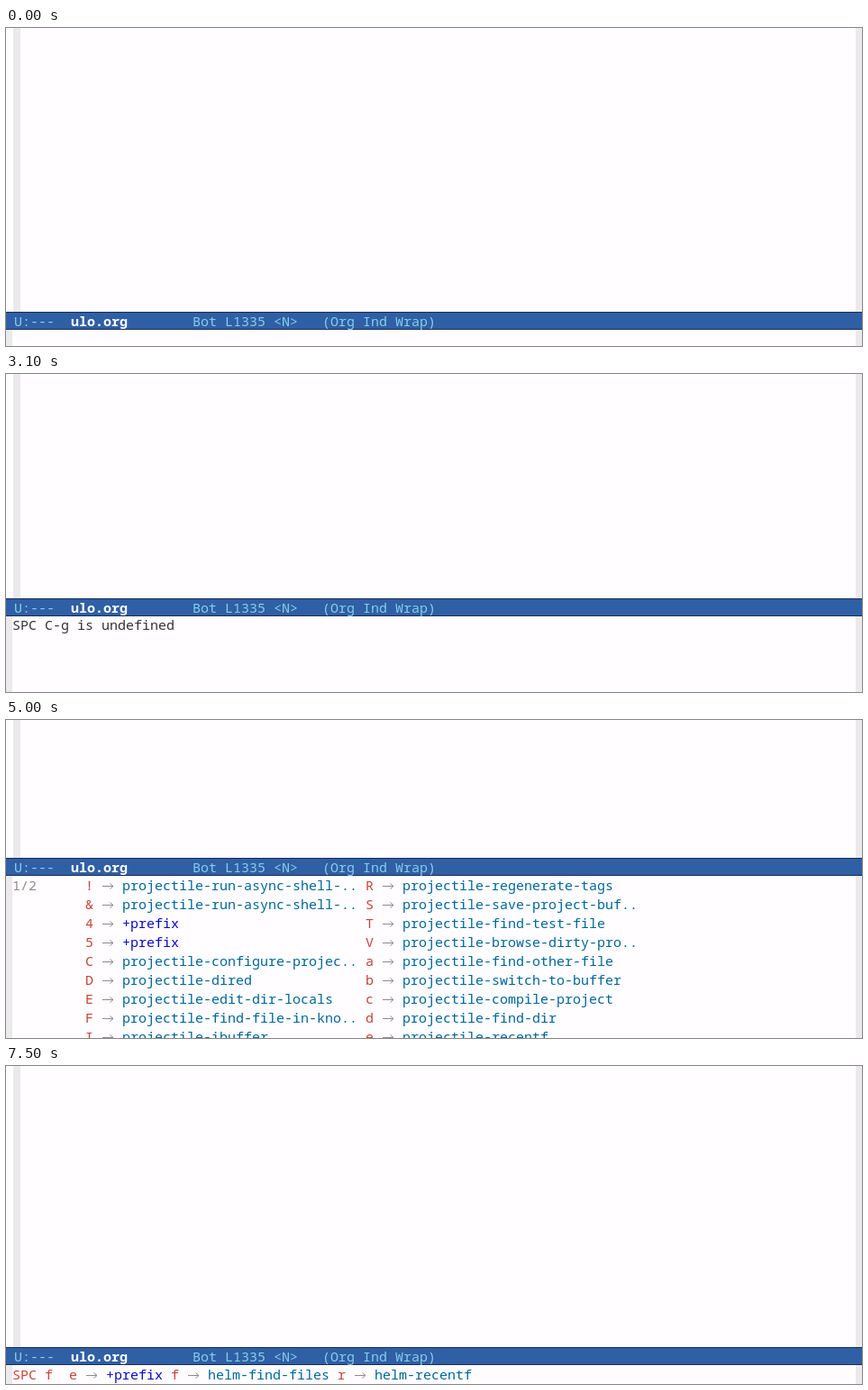
Recreate the animation shown at these times as an HTML page. Size 950 px wide and 353 px high, loop 8000 ms.

```html
<!DOCTYPE html>
<html lang="en">
<head>
<meta charset="utf-8">
<title>Key hints</title>
<style>
  html, body { margin: 0; width: 100%; height: 100%; overflow: hidden; background: #fffdff; }
  svg { display: block; }
  text { font: 15px "Noto Sans Mono", monospace; fill: #333; white-space: pre; }
  .fringe { fill: #ebe9eb; }
  .edge { fill: #1a2f54; }
  .bar { fill: #2f5fa5; }
  .mode { fill: #85ceeb; }
  .name { fill: #fff; font-weight: 700; }
  .key { fill: #c6453a; }
  .group { fill: #0b0bc4; }
  .command { fill: #006699; }
  .page { fill: #8d8d84; }
  .arrow { fill: none; stroke: #8d8d84; }
</style>
</head>
<body>
<svg id="stage" width="950" height="353" viewBox="0 0 950 353"></svg>
<script>
const CELL = 9, ARROW = 14, ROW = 21, LEFT = 7, LOOP = 8000;
const stage = document.getElementById("stage");

const escapeText = s => s.replace(/&/g, "&amp;").replace(/</g, "&lt;");
const text = (x, y, s, cls = "") => `<text class="${cls}" x="${x}" y="${y}">${escapeText(s)}</text>`;
const rect = (cls, x, y, w, h) => `<rect class="${cls}" x="${x}" y="${y}" width="${w}" height="${h}"/>`;
const arrow = (x, y) => `<path class="arrow" d="M${x + 1} ${y - 4.5}h12m-3.5 -3l3.5 3l-3.5 3"/>`;

// Each column is a list of "key command" entries.
const rootMenu = {
  label: "SPC", cls: "key", x: 52,
  columns: [
    ["SPC helm-M-x", "TAB switch-to-prev-buffer", "F +prefix", "b +prefix"],
    ["c +prefix", "e +prefix", "f +prefix", "g +prefix"],
    ["h hyperbole", "i +prefix", "j +prefix", "m +prefix"],
    ["p +projectile-command-map", "q +prefix", "s +prefix", "t +prefix"],
    ["w +prefix"]
  ]
};

const projectMenu = {
  label: "1/2", cls: "page", x: 88,
  columns: [
    ["! projectile-run-async-shell-..", "& projectile-run-async-shell-..", "4 +prefix", "5 +prefix",
     "C projectile-configure-projec..", "D projectile-dired", "E projectile-edit-dir-locals",
     "F projectile-find-file-in-kno..", "I projectile-ibuffer"],
    ["R projectile-regenerate-tags", "S projectile-save-project-buf..", "T projectile-find-test-file",
     "V projectile-browse-dirty-pro..", "a projectile-find-other-file", "b projectile-switch-to-buffer",
     "c projectile-compile-project", "d projectile-find-dir", "e projectile-recentf"]
  ]
};

const fileMenu = {
  label: "SPC f", cls: "key", x: 70,
  columns: [["e +prefix"], ["f helm-find-files"], ["r helm-recentf"]]
};

// start time, top of the mode line, echo text or menu
const steps = [
  [0, 315, ""],
  [900, 315, "SPC-"],
  [1700, 249, rootMenu],
  [3100, 249, "SPC C-g is undefined"],
  [3200, 315, "SPC C-g is undefined"],
  [3500, 315, ""],
  [3700, 315, "SPC-"],
  [3800, 315, "SPC p-"],
  [5000, 153, projectMenu],
  [5700, 153, "SPC p C-g is undefined"],
  [5900, 315, "SPC p C-g is undefined"],
  [6200, 315, ""],
  [6500, 315, "SPC f-"],
  [7500, 312, fileMenu]
];

function drawMenu(menu, top) {
  let x = menu.x;
  let out = text(LEFT, top, menu.label, menu.cls);
  for (const column of menu.columns) {
    const entries = column.map(entry => entry.split(" "));
    const widest = i => CELL * Math.max(...entries.map(e => e[i].length));
    const keyEnd = x + widest(0);
    const arrowX = keyEnd + CELL;
    const nameX = arrowX + ARROW + CELL;
    entries.forEach(([key, name], i) => {
      const y = top + i * ROW;
      out += text(keyEnd - key.length * CELL, y, key, "key") + arrow(arrowX, y)
        + text(nameX, y, name, name[0] === "+" ? "group" : "command");
    });
    x = nameX + widest(1) + CELL;
  }
  return out;
}

function drawFrame(top, content) {
  const base = top + 16;
  const below = top + 20;
  return rect("fringe", 8, 0, 8, top) + rect("fringe", 943, 0, 7, top)
    + rect("fringe", 0, below, 7, 353 - below) + rect("fringe", 943, below, 7, 353 - below)
    + rect("edge", 0, top, 950, 20) + rect("bar", 0, top + 1, 950, 18)
    + text(CELL, base, "U:---", "mode")
    + text(CELL * 8, base, "ulo.org", "name")
    + text(CELL * 23, base, "Bot L1335 <N>", "mode")
    + text(CELL * 39, base, "(Org Ind Wrap)", "mode")
    + (typeof content === "string" ? text(LEFT, top + 35, content) : drawMenu(content, top + 36));
}

const origin = performance.now();
let shown;

function tick() {
  const time = (performance.now() - origin) % LOOP;
  const step = steps.findLast(([start]) => start <= time);
  if (step !== shown) {
    shown = step;
    stage.innerHTML = drawFrame(step[1], step[2]);
  }
  requestAnimationFrame(tick);
}
tick();
</script>
</body>
</html>
```
